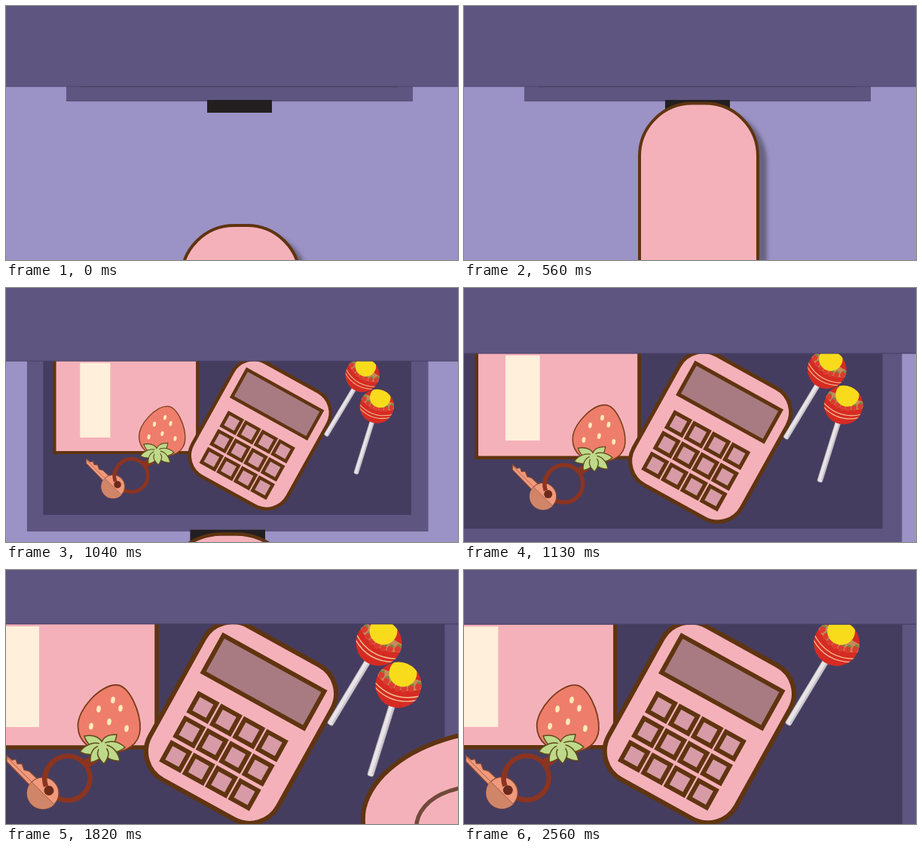
An HTML page with a canvas for the animation above (2.61 s loop, 600 px wide and 338 px high).

```html
<!DOCTYPE html>
<html lang="en">
<head>
<meta charset="utf-8">
<title>Desk drawer</title>
<style>
html, body { margin: 0; width: 100%; height: 100%; overflow: hidden; background: #9b92c6; }
canvas { display: block; width: 600px; height: 338px; }
</style>
</head>
<body>
<canvas id="stage" width="600" height="338"></canvas>
<script>
const ctx = document.getElementById('stage').getContext('2d');
const LOOP = 2610;
const ZOOM = 1.56;
const PIVOT = { x: 410, y: 170 };
const OPEN = 176;
const REACH = 215;
const WALL = '#9b92c6', WOOD = '#5e5580', INSIDE = '#443d60';
const PINK = '#f5b1ba', BROWN = '#5f3410';

const mix = (a, b, p) => a + (b - a) * p;
function ease(t, start, end) {
  const p = Math.min(1, Math.max(0, (t - start) / (end - start)));
  return p * p * (3 - 2 * p);
}

function rect(x, y, w, h, color) {
  ctx.fillStyle = color;
  ctx.fillRect(x, y, w, h);
}

function paint(shape, fill, stroke, width) {
  const path = typeof shape === 'string' ? new Path2D(shape) : shape;
  if (fill) { ctx.fillStyle = fill; ctx.fill(path); }
  if (stroke) { ctx.strokeStyle = stroke; ctx.lineWidth = width; ctx.stroke(path); }
}

function box(x, y, w, h, r = 0) {
  const path = new Path2D();
  if (r) path.roundRect(x, y, w, h, r);
  else path.rect(x, y, w, h);
  return path;
}

function oval(x, y, rx, ry = rx, turn = 0) {
  const path = new Path2D();
  path.ellipse(x, y, rx, ry, turn, 0, Math.PI * 2);
  return path;
}

function placed(x, y, turn, draw) {
  ctx.save();
  ctx.translate(x, y);
  ctx.rotate(turn);
  draw();
  ctx.restore();
}

function scaled(k, draw) {
  ctx.save();
  ctx.translate(PIVOT.x, PIVOT.y);
  ctx.scale(k, k);
  ctx.translate(-PIVOT.x, -PIVOT.y);
  draw();
  ctx.restore();
}

function notebook() {
  paint(box(-55.5, 20, 255.5, 216), PINK, BROWN, 5.5);
  rect(-10, 75, 54, 134, '#ffefdb');
}

function keyring() {
  paint(oval(82, 277, 29.5), null, '#8b3420', 6.5);
  paint('M103 260 L119 250', null, '#8b3420', 12);
  paint('M1 247 L8 253 L13 252 L15 258 L21 258 L24 266 L31 268 L45 281 L34 289 L1 255 Z', '#f0997c', '#8a4a30', 1.2);
  paint(oval(49, 297, 21), '#f0997c', '#8a4a30', 1.2);
  paint('M34 282 A21 21 0 0 0 64 312 Z', '#d08568');
  paint('M1 249 L64 312', null, '#a85c42', 1);
  paint(oval(57, 293.5, 6.5), '#6b2a1a');
  paint('M53 288 A29.5 29.5 0 0 1 57 261', null, '#8b3420', 6.5);
}

function strawberry() {
  paint('M146 153 C164 153 179 190 178 212 C177 232 160 243 138 243 C112 243 96 228 95.5 208 C95 185 125 153 146 153 Z',
    '#ee7e6b', '#7a3d1a', 1.8);
  for (const [x, y] of [[142, 173], [123, 185], [152, 184], [137, 202], [160, 211], [113, 208]])
    paint(oval(x, y, 2.8, 4.5, 0.15), '#ffe9bd');
  const tips = [[104, 221], [147, 219], [158, 236], [98, 242], [151, 254], [112, 256], [130, 258]];
  for (const [x, y] of tips) {
    const dx = x - 128, dy = y - 235, length = Math.hypot(dx, dy);
    placed(128, 235, Math.atan2(dy, dx), () =>
      paint(`M-2 0 C6 -11 ${length - 9} -8 ${length} 0 C${length - 9} 8 6 11 -2 0 Z`, '#bdd989', '#5f4a1c', 1.5));
  }
  paint(oval(128, 235, 6), '#bdd989');
}

function calculator() {
  placed(312, 203, 29 * Math.PI / 180, () => {
    paint(box(-97, -117, 194, 234, 43), PINK, BROWN, 6.2);
    paint(box(-76.5, -90, 153, 56), '#a87b82', BROWN, 6);
    for (let row = -1; row <= 1; row++)
      for (let col = -1.5; col <= 1.5; col++)
        paint(box(col * 34.8 - 15, row * 37.3 + 31, 26.5, 26.5), '#d79ba8', BROWN, 6);
  });
}

function lollipop(x, y, degrees) {
  placed(x, y, degrees * Math.PI / 180, () => {
    paint(box(-4, 25, 8, 102, 2.5), '#e8e4e7', '#aaa4ad', 0.8);
    rect(1.5, 28, 2, 96, '#c9c4cc');
    ctx.save();
    ctx.clip(oval(0, 0, 30.5));
    rect(-31, -31, 62, 62, '#d52b23');
    paint('M-31 -4 Q0 16 31 -4 L31 -14 L-31 -14 Z', '#c78a5b');
    for (let i = -3; i <= 3; i++) {
      const px = i * 8.5, py = 4 - i * i * 1.1;
      paint(oval(px, py, 4, 5), '#dc3c30');
      paint(oval(px, py - 5, 3, 1.6), '#6f8b3c');
    }
    paint('M-31 6 Q0 24 31 6 M-31 11 Q0 30 31 11', null, '#f3c08f', 1.4);
    ctx.restore();
  });
  // plain disc in place of the wrapper label
  ctx.save();
  ctx.clip(oval(x, y, 30.5));
  paint(oval(x + 6, y - 16, 18.5), '#f8dc1c');
  ctx.restore();
}

function palm() {
  paint('M900 420 L640 180 C598 143 562 134 515 148 C459 164 411 197 400 242 C394 271 408 305 422 342 L470 480 L900 700 Z',
    PINK, BROWN, 6);
}

function thumb() {
  const line = 'M571 210 C535 211 506 217 487 233 C468 250 465 270 476 285 C494 309 545 309 602 308';
  paint(line + ' L900 308 L900 400 L900 210 Z', PINK);
  paint('M571 212 L900 212 L900 823 Z', '#f6b6be');
  paint(line + ' L900 308', null, '#714a3a', 5.5);
}

function finger(top, zoom) {
  const shape = box(233, top + 2, 157, 500, 70);
  ctx.save();
  ctx.shadowColor = 'rgba(70,68,82,0.6)';
  ctx.shadowBlur = 5 * zoom;
  ctx.shadowOffsetX = 12 * zoom;
  ctx.shadowOffsetY = 8 * zoom;
  paint(shape, PINK);
  ctx.restore();
  paint(shape, PINK, BROWN, 4);
}

function drawerContents(away, taken) {
  const handShown = away < REACH;
  notebook();
  keyring();
  strawberry();
  calculator();
  lollipop(495, 97, 31);
  if (handShown) placed(away, away, 0, palm);
  if (taken < REACH) placed(taken, taken, 0, () => lollipop(521, 153, 17.3));
  if (handShown) placed(away, away, 0, thumb);
}

function draw(t) {
  const slide = OPEN * ease(t, 560, 1025);
  const zoom = 1 + (ZOOM - 1) * (ease(t, 880, 1340) - ease(t, 2533, 2993));
  const fingerTop = mix(290, 127, ease(t, 0, 545)) + (OPEN + 1) * ease(t, 545, 1020);
  const taken = REACH * ease(t, 2170, 2533);
  const away = REACH * (1 - ease(t, 1400, 2100)) + taken;

  rect(0, 0, 600, 338, WALL);
  scaled(zoom, () => {
    rect(80, -200, 460, 327 + slide, WOOD);
    rect(98.5, -200, 422, 308 + slide, INSIDE);
    rect(267, 125 + slide, 86, 17, '#231f20');
    ctx.save();
    ctx.translate(0, slide - OPEN);
    scaled(1 / ZOOM, () => drawerContents(away, taken));
    ctx.restore();
    rect(-300, -300, 1200, 407.2, WOOD);
    rect(-300, 106.7, 1200, 0.7, '#463e62');
    finger(fingerTop, zoom);
  });
}

function frame() {
  draw(performance.now() % LOOP);
  requestAnimationFrame(frame);
}
frame();
</script>
</body>
</html>
```
